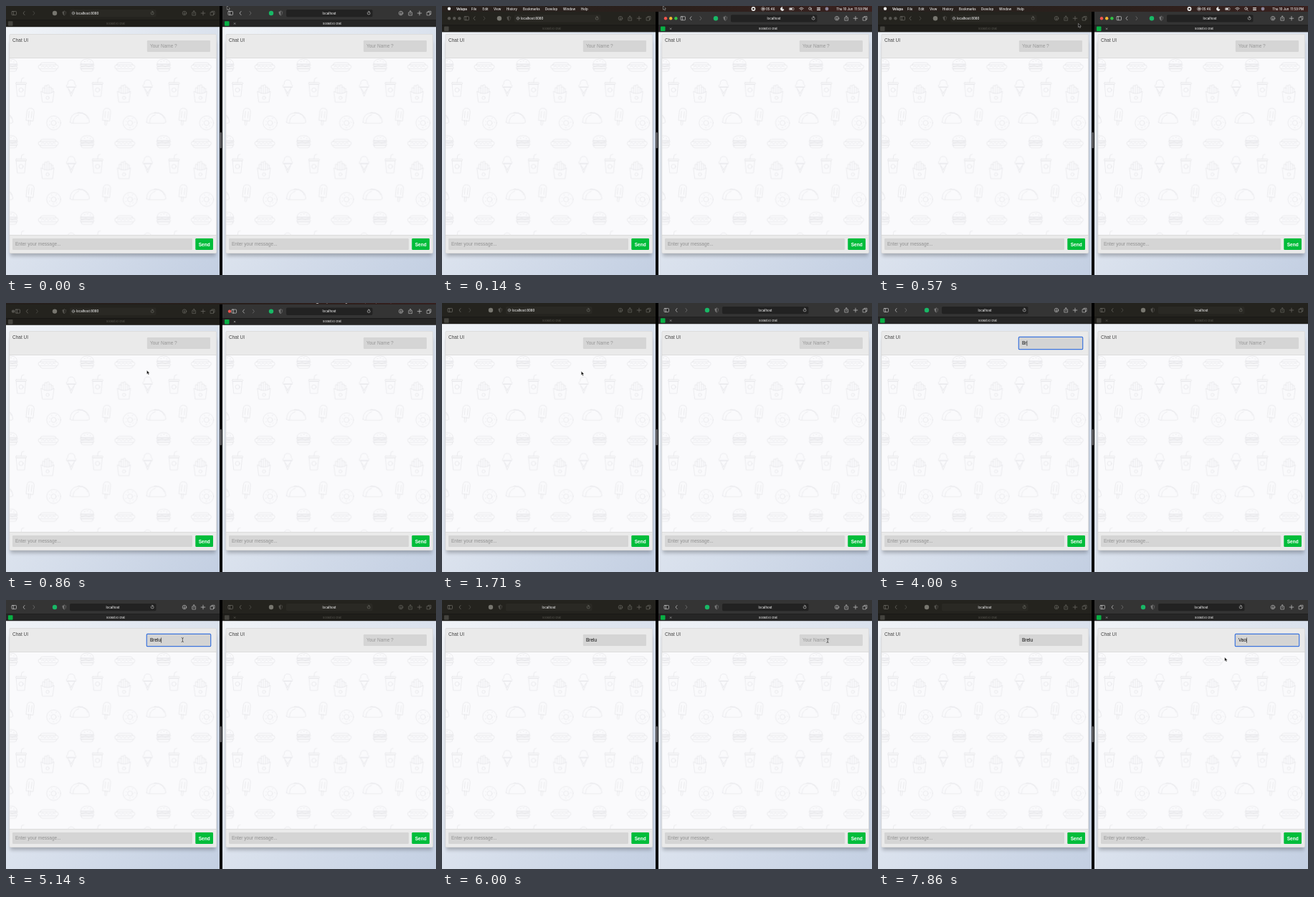
Write an HTML page that moves like this. It is 600x375 px and loops after 8 s.

```html
<!DOCTYPE html>
<html lang="en">
<head>
<meta charset="utf-8">
<title>Chat demo</title>
<style>
  html, body { margin: 0; width: 100%; height: 100%; overflow: hidden; background: #000; }
  svg { display: block; width: 100vw; height: 100vh; }
  .page { font: 6.5px "Liberation Sans", Arial, sans-serif; }
  .ui { font: 500 4.4px Inter, sans-serif; }
  .bold { font-weight: 700; }
  .mid { text-anchor: middle; }
  .line { fill: none; stroke-linecap: round; stroke-linejoin: round; }
  .shadow { filter: blur(2.6px); }
</style>
</head>
<body>
<svg id="stage" viewBox="0 0 600 375">
  <defs>
    <linearGradient id="sky" x2="1" y2="1">
      <stop stop-color="#f1f4f8"/><stop offset="1" stop-color="#c3cfe2"/>
    </linearGradient>
    <linearGradient id="menuBack">
      <stop stop-color="#27211e"/><stop offset=".55" stop-color="#2b201c"/><stop offset="1" stop-color="#3a211f"/>
    </linearGradient>
    <g id="hotdog">
      <rect x="-14" y="-3" width="28" height="5.6" rx="2.8"/>
      <path d="M-11-3q0-3 3-3h16q3 0 3 3M-12 2.600q1 3.400 4 3.400h16q3 0 4-3.400M-10 0l2.500-1.400 2.500 2 2.500-2 2.500 2 2.500-2 2.500 2 2.500-2 2.500 1.400"/>
    </g>
    <g id="burger">
      <path d="M-9-1.500q0-7 9-7t9 7zM-9 1q2.200 2 4.500 0t4.500 0 4.500 0 4.500 0M-8.500 5h17q0 3.500-3 3.500h-11q-3 0-3-3.500zM-4-5h1M0-6h1M4-4.500h1"/>
      <rect x="-9.500" y="-1.500" width="19" height="2.500" rx="1"/><rect x="-9.500" y="2.500" width="19" height="2.500" rx="1"/>
    </g>
    <g id="cup">
      <path d="M-6.500-5h13l-1.600 17h-9.800zM0-7.500l1-5.500 3-1"/>
      <rect x="-7.500" y="-7.500" width="15" height="2.500" rx="1"/><circle cy="3" r="3"/>
    </g>
    <g id="fries">
      <path d="M-9-3q9 6 18 0l-2 15h-14zM-7-2v-6h3v8M-4-7v-4h3v11M-1-11q0-2 3-1v12M2-9h3v8M5-7h2.500v5"/>
      <circle cy="6" r="2.200"/>
    </g>
    <g id="cone">
      <path d="M-5-1l5 13 5-13zM-6.500-1q-1-3 1.500-4 0-6 5-6t5 6q2.500 1 1.500 4zM-3.500 2l4.500 6M3.500 2l-4.500 6"/>
    </g>
    <g id="popsicle" transform="rotate(6)">
      <path d="M-5 5.500v-12q0-5 5-5t5 5v12zM-1.300 5.500v6q1.300 1.500 2.600 0v-6M-2-7v9M2-7v9"/>
    </g>
    <g id="donut">
      <circle r="9.800"/><circle r="3.500"/>
      <path d="M-6-3l1 1M-3-6.500l.5 1M3-6l1-.8M6-1.500l.8 1M4.500 4l-1 1M-1 6.500h1.300M-6 3l.6-1"/>
    </g>
    <g id="taco">
      <path d="M-13.500 6q0-12 11-13 15-1 16 13-2 1.500-4 1.500h-19q-3 0-4-1.500zM-9.500 7q0-9 8-11.500M-3-7q2-1.500 4 0 3-1 4 1.500 3 0 4 3 2 1 2 3"/>
    </g>
  </defs>
  <g id="pages"></g>
  <g id="live"></g>
</svg>
<script>
const LOOP = 8000, TICKS = 56, RIGHT = 302;
const LEFT_NAME = 'Brelu', RIGHT_NAME = 'Vao';
const $ = id => document.getElementById(id);

const rect = (x, y, w, h, fill, extra = '') =>
  `<rect x="${x}" y="${y}" width="${w}" height="${h}" fill="${fill}" ${extra}/>`;
const text = (x, y, str, fill, cls = '', extra = '') =>
  `<text x="${x}" y="${y}" fill="${fill}" class="${cls}" ${extra}>${str}</text>`;
const line = (d, color, width = .7, extra = '') =>
  `<path class="line" d="${d}" stroke="${color}" stroke-width="${width}" ${extra}/>`;
const dot = (x, y, r, fill) => `<circle cx="${x}" cy="${y}" r="${r}" fill="${fill}"/>`;
const shift = (x, y, body) => `<g transform="translate(${x} ${y})">${body}</g>`;

// Food wallpaper: one tile, with edge icons drawn on both sides.
const FOOD = [
  ['hotdog', 54, 12], ['burger', 1.5, 9.5], ['burger', 108.2, 9.500], ['cup', 16, 41],
  ['fries', 53, 49], ['cone', 86, 41], ['popsicle', 28.5, 81], ['donut', 61.500, 90],
  ['taco', 98, 83], ['taco', -8.700, 83]
];
const wallpaper = `<pattern id="food" x="5" y="73" width="106.7" height="106.7" patternUnits="userSpaceOnUse">
  <g class="line" stroke="#dfdfe1" stroke-width=".55">${FOOD.map(([id, x, y]) =>
    shift(x, y, `<use href="#${id}"/>`)).join('')}</g></pattern>`;

const page = () => `<g class="page">
  ${rect(0, 29, 298, 346, 'url(#sky)')}
  ${rect(6, 50, 286.500, 298.500, '#000', 'class="shadow" opacity=".24"')}
  ${rect(4.500, 39, 289.500, 306, '#d8d8d8', 'rx="2"')}
  ${rect(5.200, 39.800, 288, 32.400, '#eaeaea', 'rx="1"')}
  ${rect(5.200, 73, 288, 246, '#fafafc')}
  ${rect(5.200, 73, 288, 246, 'url(#food)')}
  ${rect(5.200, 319.800, 288, 24.500, '#eaeaea', 'rx="1"')}
  ${text(9, 49.800, 'Chat UI', '#444')}
  ${rect(9, 324, 251, 16, '#d5d5d5', 'rx="1.2"')}
  ${text(13, 334.400, 'Enter your message...', '#929292')}
  ${rect(264.300, 324, 24.700, 16, '#00bd3b', 'rx="1.2"')}
  ${text(276.700, 334.500, 'Send', '#fff', 'bold mid')}
</g>`;

$('pages').innerHTML = `<defs>${wallpaper}</defs>` + page() + shift(RIGHT, 0, page()) +
  rect(298, 0, 4, 375, '#000') + rect(298.700, 176, 2.200, 22.500, '#77777a', 'rx="1.1"');

function nameField(value, focused) {
  const box = focused
    ? rect(196.300, 47.300, 89.400, 17.400, '#d4d4d4', 'rx="1.300" stroke="#3c74dc" stroke-width="1.2"')
    : rect(196.800, 48, 88.200, 16, '#d5d5d5', 'rx="1.200"');
  const label = value
    ? text(201, 58.400, value, '#0c0c0c', '', 'data-name')
    : text(201, 58.400, 'Your Name ?', '#979797');
  return `<g class="page">${box}${label}${focused ? '<path class="caret" stroke="#111" stroke-width=".6"/>' : ''}</g>`;
}

const THEMES = {
  on: { bar: '#343434', tab: '#262626', field: '#222', icon: '#cacaca', faint: '#777', title: '#eee', badge: '#18b866', fav: '#08b044' },
  off: { bar: '#24231e', tab: '#1f1e1a', field: '#2a2924', icon: '#706f69', faint: '#54534e', title: '#55544e', badge: '#77766f', fav: '#44433e' }
};

function toolbar(active, menu, url, closable) {
  const c = active ? THEMES.on : THEMES.off;
  const mid = menu > .5 ? 12 : 0, side = 23 * menu, nav = 20 * menu;
  const chevron = (x, dir, color) => line(`M${x + dir} 7.500l${-2 * dir} 2.500 ${2 * dir} 2.500`, color);
  const lights = menu > .1 ? ['#f5554d', '#f3b72f', '#32c146'].map((fill, i) =>
    menu > .5 || !i ? dot(10 + 7.200 * i, 10, 2.200, active ? fill : '#55544f') : '').join('') : '';
  const ring = url === 'edit' || url === 'blank';
  const address = url === 'centre'
    ? text(149, 11.600, 'localhost', '#e4e4e4', 'mid')
    : `<circle cx="94" cy="10" r="1.900" class="line" stroke="#aaa" stroke-width=".6"/>` +
      line('M92.100 10h3.800M94 8.100v3.800', '#aaa', .4) +
      (url === 'edit' ? text(97.800, 11.600, 'localhost:8080', '#ececec') : '');
  return shift(0, 7.200 * menu, `<g class="ui">
    ${rect(0, 0, 298, 20, c.bar)}${rect(0, 19.600, 298, 9.600, c.tab)}
    ${rect(0, 19.400, 298, .5, '#111')}
    ${lights}
    ${shift(side, 0, `<rect x="8" y="7.500" width="6.500" height="5" rx=".8" class="line" stroke="${c.icon}" stroke-width=".7"/>` +
      line('M10.300 7.500v5', c.icon))}
    ${shift(nav, 0, chevron(25, 1, c.icon) + chevron(39, -1, c.faint))}
    ${shift(mid, 0, dot(68, 10, 3.200, c.badge) +
      line('M81.300 7.200q-1.300.9-2.500.9 0 4 2.500 5.200 2.500-1.200 2.500-5.200-1.200 0-2.500-.9z', c.faint, .6) +
      `<path d="M81.300 7.200q-1.300.9-2.500.9 0 4 2.500 5.200z" fill="${c.faint}"/>` +
      rect(89, 5, 120.500, 10.300, c.field, `rx="1.800" ${ring && active ? 'stroke="#2295ad" stroke-width="1.300"' : ''}`) +
      address + line('M206.200 9.600a2 2 0 1 1-1-1.400M204 7.200l1.400 1-1 1.300', c.icon, .6))}
    <circle cx="249" cy="10" r="2.800" class="line" stroke="${c.icon}" stroke-width=".6"/>
    ${line('M249 8.400v3M247.800 10.400l1.200 1.200 1.200-1.200', c.icon, .6)}
    ${line('M260.800 9h-1v4h4.800v-4h-1M262.200 11v-4.300M260.900 8l1.300-1.300 1.300 1.300', c.icon, .6)}
    ${line('M275 7.200v5.600M272.200 10h5.600', c.icon)}
    ${line('M285.500 8.700h4v4.200h-4zM287 8.700v-1.400h4v4.200h-1.500', c.icon, .6)}
    ${rect(3, 21.300, 6.500, 6.500, c.fav, 'rx=".8"')}
    ${closable ? line('M16.200 23.600l1.800 1.800M18 23.600l-1.800 1.800', c.icon, .5) : ''}
    ${text(153, 25.900, 'Socket.IO chat', c.title, 'mid', 'style="font-size:3.700px"')}
  </g>`);
}

const MENUS = [['File', 41], ['Edit', 56.500], ['View', 72], ['History', 90], ['Bookmarks', 113],
  ['Develop', 144], ['Window', 169], ['Help', 194]];

function menuBar(menu) {
  if (!menu) return '';
  const w = '#eee';
  return shift(0, 8 * (menu - 1), `<g class="ui">
    ${rect(0, 0, 600, 8, 'url(#menuBack)')}
    ${dot(10, 3.800, 2.200, w)}
    ${text(20, 5.500, 'Velupa', w, 'bold')}
    ${MENUS.map(([label, x]) => text(x, 5.500, label, w)).join('')}
    ${dot(434.500, 4, 2.900, w)}${dot(434.500, 4, 1.300, '#2b201c')}
    <circle cx="448" cy="4" r="2.300" class="line" stroke="${w}" stroke-width=".6"/>${dot(448, 4, 1, w)}
    ${text(452, 5.600, '05:46', w)}
    ${line('M474.500 1.700a2.400 2.400 0 1 0 2.600 3.200q-3 .2-2.600-3.200z', w, .7, 'style="fill:#eee"')}
    ${rect(484.500, 2.500, 6.500, 3.200, 'none', `stroke="${w}" stroke-width=".5" rx=".7"`)}${rect(485.200, 3.200, 3.500, 1.800, w)}
    ${line('M498.700 3.300q2.800-2.400 5.600 0M499.900 4.600q1.600-1.300 3.200 0M501.500 6v.1', w)}
    <circle cx="513.500" cy="3.600" r="1.700" class="line" stroke="${w}" stroke-width=".7"/>${line('M514.800 4.900l1.300 1.300', w)}
    ${line('M523.500 2.800h4M523.500 5.300h4', w, 1.200)}
    ${dot(537, 4, 2.400, '#8b8399')}
    ${text(594, 5.600, 'Thu 10 Jun&#160; 11:59 PM', w, '', 'text-anchor="end"')}
  </g>`);
}

// Pointer path as [tick, x, y]
const PATH = [[0, 308.500, 0], [3, 308.500, 0], [6, 196.500, 94], [8, 191, 100], [11, 191, 100],
  [16, 223, 55.500], [35, 223, 55.500], [41, 538, 56.500], [54, 538, 56.500], [55, 483.700, 80]];

function pointer(tick) {
  if ((tick >= 27 && tick < 35) || (tick >= 49 && tick < 55)) return '';
  const i = Math.max(1, PATH.findIndex(p => p[0] >= tick));
  const [t0, x0, y0] = PATH[i - 1], [t1, x1, y1] = PATH[i];
  const u = (tick - t0) / (t1 - t0), e = u * u * (3 - 2 * u);
  const x = x0 + (x1 - x0) * e, y = y0 + (y1 - y0) * e;
  const local = x >= RIGHT ? x - RIGHT : x;
  const overField = local > 197 && local < 285 && y > 48 && y < 64;
  const beam = 'M-1.200-3q1.200 0 1.200 1v4q0 1-1.200 1M1.200-3q-1.200 0-1.200 1M0 2q0 1 1.200 1';
  return shift(x, y, overField
    ? line(beam, '#eee', 1.300) + line(beam, '#222', .7)
    : '<path d="M0 0v5.200l1.200-1.100.9 2 1-.4-.9-2h1.700z" fill="#080808" stroke="#eee" stroke-width=".4"/>');
}

// Last step reached in a list of [tick, value]
const at = (steps, tick) => steps.reduce((v, s) => tick >= s[0] ? s[1] : v, steps[0][1]);
const MENU = [[0, 0], [1, 1], [5, .6], [6, .22], [7, 0]];
const ADDRESS = [[0, 'edit'], [18, 'blank'], [19, 'centre']];
const LEFT_TYPED = [[0, 0], [27, 1], [28, 2], [30, 3], [31, 4], [32, 5]];
const RIGHT_TYPED = [[0, 0], [49, 1], [50, 2], [51, 3]];

function draw(tick) {
  const menu = at(MENU, tick), leftOn = tick >= 17 && tick < 41;
  const left = LEFT_NAME.slice(0, at(LEFT_TYPED, tick));
  const right = RIGHT_NAME.slice(0, at(RIGHT_TYPED, tick));
  $('live').innerHTML =
    nameField(left, tick >= 20 && leftOn) + shift(RIGHT, 0, nameField(right, tick >= 43)) +
    toolbar(leftOn, menu, at(ADDRESS, tick), false) +
    shift(RIGHT, 0, toolbar(!leftOn, menu, 'centre', true)) +
    menuBar(menu) + pointer(tick);
  for (const caret of document.querySelectorAll('.caret')) {
    const label = caret.parentNode.querySelector('[data-name]');
    const x = 201.400 + (label ? label.getComputedTextLength() : 0);
    caret.setAttribute('d', `M${x} 52.500v7.300`);
  }
}

let shown = -1;
const start = performance.now();
function frame() {
  const ms = (performance.now() - start) % LOOP;
  const tick = Math.min(TICKS - 1, Math.floor((ms + 4) * TICKS / LOOP));
  if (tick !== shown) draw(shown = tick);
  requestAnimationFrame(frame);
}
frame();
</script>
</body>
</html>
```
